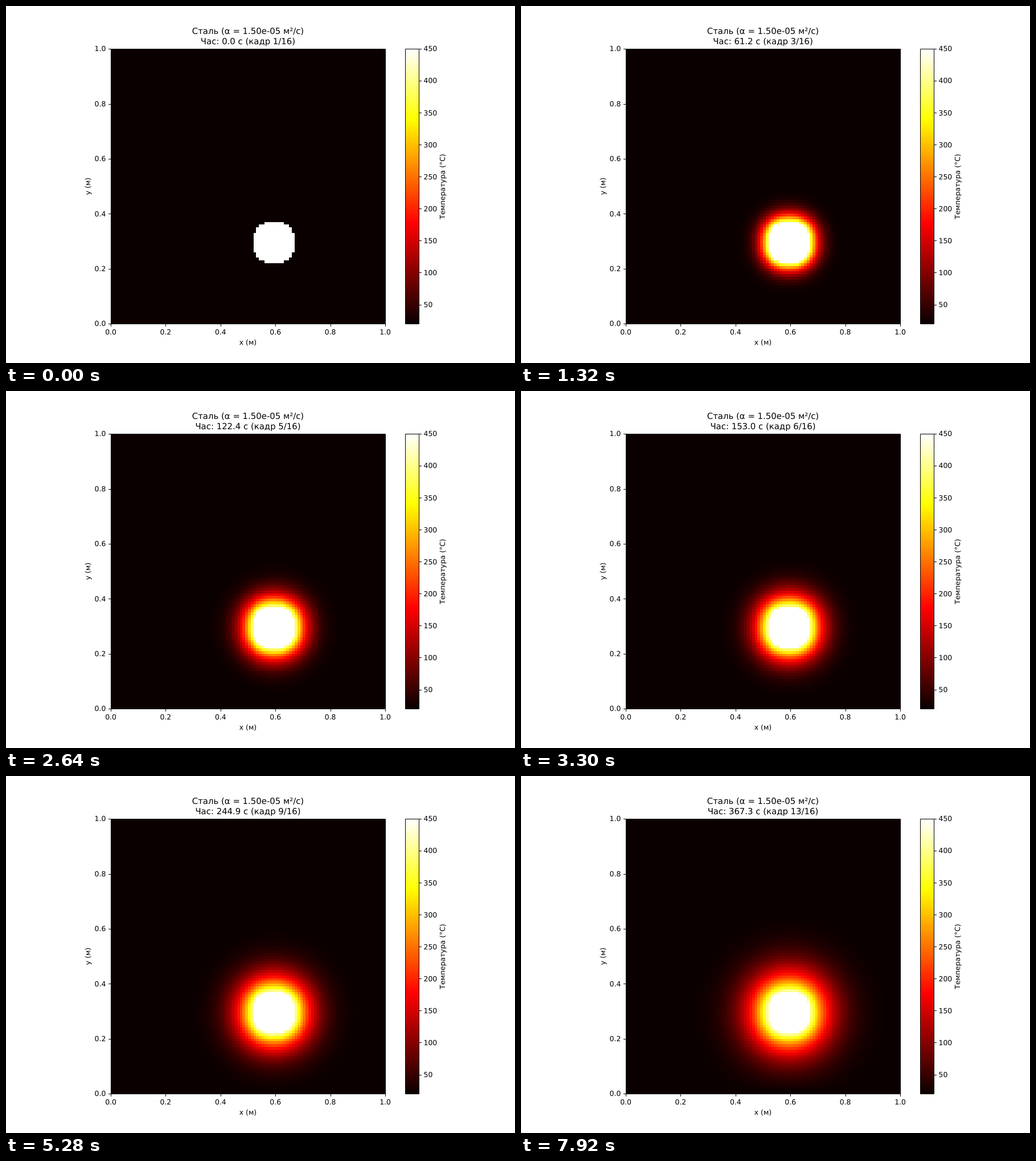
An HTML page with a canvas that plays this animation: 894x626 px, repeating every 8000 ms.

```html
<!DOCTYPE html>
<html lang="uk">
<head>
<meta charset="utf-8">
<style>
  html, body { margin: 0; width: 100%; height: 100%; overflow: hidden; background: #fff; }
  canvas, svg { position: absolute; left: 0; top: 0; }
  text { font: 12.42px "DejaVu Sans", sans-serif; text-rendering: geometricPrecision; white-space: pre; }
  .title { font-size: 14.9px; }
  path { fill: none; stroke: #000; }
</style>
</head>
<body>
<canvas id="stage" width="894" height="626"></canvas>
<svg id="axes" width="894" height="626"></svg>
<script>
const N = 100, STEP_MS = 660, LOOP_MS = 8000, STATES = 13;
const AMBIENT = 20, HOT = 450, R = 0.225, SUBSTEPS = 20, ALPHA = 1.5e-5;
const DT = R / (99 * 99 * ALPHA);
const LEFT = 184, TOP = 75, SIZE = 482, BAR = 701;
const ctx = document.getElementById('stage').getContext('2d');
const svg = document.getElementById('axes');

function add(tag, attrs, text = '') {
  const el = document.createElementNS('http://www.w3.org/2000/svg', tag);
  for (const k in attrs) el.setAttribute(k, attrs[k]);
  el.textContent = text;
  svg.append(el);
  return el;
}
const line = d => add('path', { d });
const label = (text, x, y, anchor = 'middle', more = {}) =>
  add('text', { x, y, 'text-anchor': anchor, ...more }, text);
const upright = (text, x, y) =>
  label(text, 0, 0, 'middle', { transform: `translate(${x} ${y}) rotate(-90)` });
const snap = v => Math.round(v) + 0.5;

// "hot" colour map, 256 levels
function hot(temp) {
  const level = Math.floor((temp - AMBIENT) / (HOT - AMBIENT) * 256);
  const v = Math.max(0, Math.min(255, level)) / 255;
  const ramp = (a, b, from = 0) =>
    Math.round(255 * Math.max(0, Math.min(1, from + (1 - from) * (v - a) / (b - a))));
  return [ramp(0, 0.365079, 0.0416), ramp(0.365079, 0.746032), ramp(0.746032, 1), 255];
}

function bitmap(w, h, tempAt) {
  const c = document.createElement('canvas');
  c.width = w;
  c.height = h;
  const g = c.getContext('2d'), img = g.createImageData(w, h);
  for (let y = 0; y < h; y++)
    for (let x = 0; x < w; x++) img.data.set(hot(tempAt(x, h - 1 - y)), (y * w + x) * 4);
  g.putImageData(img, 0, 0);
  return c;
}

// Heat equation with a constantly hot disc and cold edges
const isSource = (x, y) => (x - 59) ** 2 + (y - 29) ** 2 < 63;

function diffuse(u) {
  const next = u.slice();
  for (let y = 1; y < N - 1; y++)
    for (let x = 1; x < N - 1; x++) {
      const i = y * N + x;
      if (!isSource(x, y))
        next[i] = u[i] + R * (u[i - 1] + u[i + 1] + u[i - N] + u[i + N] - 4 * u[i]);
    }
  return next;
}

let field = Float64Array.from({ length: N * N },
  (_, i) => isSource(i % N, Math.floor(i / N)) ? HOT : AMBIENT);
const maps = [];
for (let k = 0; k < STATES; k++) {
  maps.push(bitmap(N, N, (x, y) => field[y * N + x]));
  for (let s = 0; s < SUBSTEPS; s++) field = diffuse(field);
}

// Axes, ticks and labels
for (let k = 0; k <= 5; k++) {
  const text = (k / 5).toFixed(1), x = 184.01 + k * 96.404, y = 557.14 - k * 96.404;
  line(`M${snap(x)} 557.5V562`);
  line(`M184.5 ${snap(y)}H180`);
  label(text, x, 576);
  label(text, 175.3, Math.round(y + 4.3), 'end');
}
for (let t = 50; t <= HOT; t += 50) {
  const y = 557.14 - (t - AMBIENT) / (HOT - AMBIENT) * 482.02;
  line(`M725.5 ${snap(y)}H730`);
  label(t, 733.5, Math.round(y + 4.3), 'start');
}
line('M184.5 75.5H666.5V557.5H184.5Z');
line('M701.5 75.5H725.5V557.5H701.5Z');
label('x (м)', 425, 594);
upright('y (м)', 148, 316);
upright('Температура (°C)', 771, 316.5);
label('Сталь (α = 1.50e-05 м²/с)', 425, 49, 'middle', { class: 'title' });
const clock = label('', 425, 67, 'middle', { class: 'title' });

ctx.imageSmoothingEnabled = false;
ctx.drawImage(bitmap(1, 256, (x, y) => AMBIENT + (y + 0.5) / 256 * (HOT - AMBIENT)), BAR, TOP, 24, SIZE);

let shown = -1;
function show(k) {
  if (k === shown) return;
  shown = k;
  ctx.drawImage(maps[k], LEFT, TOP, SIZE, SIZE);
  clock.textContent = `Час: ${(k * SUBSTEPS * DT).toFixed(1)} с (кадр ${k + 1}/16)`;
}

let start;
function tick(now) {
  start ??= now;
  show(Math.floor((now - start) % LOOP_MS / STEP_MS));
  requestAnimationFrame(tick);
}
show(0);
requestAnimationFrame(tick);
</script>
</body>
</html>
```
